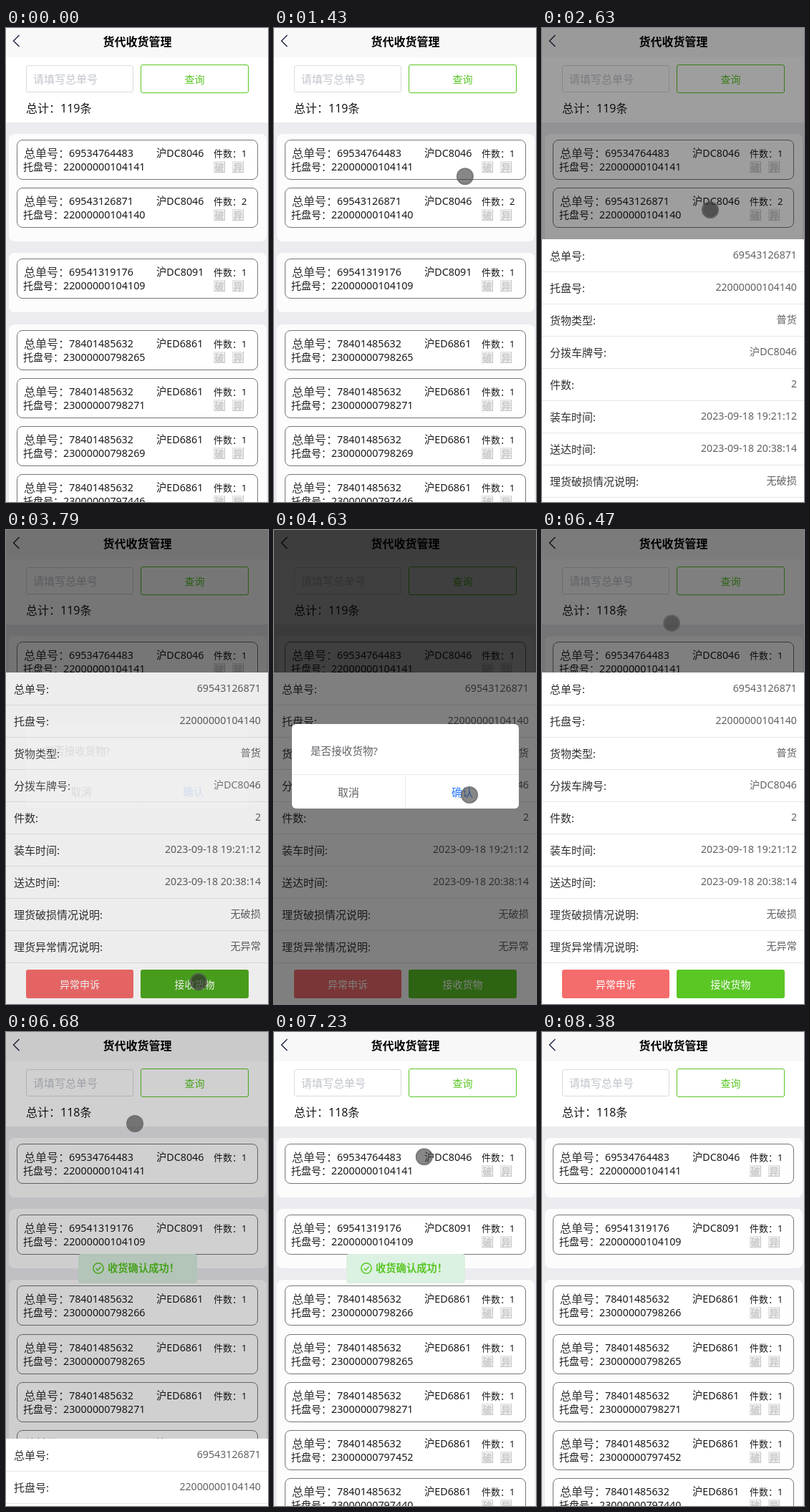
An HTML page for the animation above (8.77 s loop, 366x662 px).

```html
<!DOCTYPE html>
<html lang="zh-CN">
<head>
<meta charset="utf-8">
<style>
html, body { margin: 0; width: 100%; height: 100%; overflow: hidden; }
body { font: 14.3px/20px "Noto Sans", "Noto Sans CJK SC", "Noto Sans CJK", sans-serif; color: #1a1a1a; }
div, span { position: absolute; box-sizing: border-box; white-space: nowrap; }
#stage { left: 0; top: 0; width: 366px; height: 662px; overflow: hidden; background: #ebebf0; }
.fill { left: 0; top: 0; width: 366px; height: 662px; }
.card { left: 4px; width: 360px; border-radius: 8px; background: #fcfcfd; }
.row { left: 15px; width: 337px; height: 56px; border: 1px solid #777; border-radius: 8px; background: #fff; }
.kai { font-size: 16px; font-weight: 300; color: #333; }
.small { font-size: 13px; }
.badge { width: 16px; height: 16px; background: #eee; border: 1px solid #ddd; border-color: #e2e2e2 #c4c4c4 #c4c4c4 #e2e2e2;
  color: #c9c9c9; font: bold 13px/14px "Noto Sans CJK SC", "Noto Sans CJK", sans-serif; text-align: center; }
.btn { height: 40px; border-radius: 3px; font-size: 14px; line-height: 40px; text-align: center; }
.label { font-size: 15px; color: #303133; }
.value { right: 10px; font-size: 14.2px; color: #606266; }
.line { left: 0; width: 366px; height: 1px; background: #e6e6e8; }
#sheet { left: 0; top: 0; width: 366px; height: 464px; background: #fff; }
#dialog { left: 24.5px; top: 271px; width: 317px; height: 118px; border-radius: 6px; background: #fff; overflow: hidden; }
#toast { left: 101px; top: 310px; width: 166px; height: 41px; border-radius: 4px; background: #dbf1e1; color: #5ac725; }
#cursor { left: -12px; top: -12px; width: 24px; height: 24px; border-radius: 50%;
  border: 2px solid rgba(110,110,110,.47); background-clip: padding-box; }
</style>
</head>
<body>
<div id="stage">
  <div id="first"></div>
  <div id="second"></div>
  <div id="empty"></div>
  <div id="head"></div>
  <div id="toast"></div>
  <div id="mask" class="fill" style="background:#000"></div>
  <div id="sheet"></div>
  <div id="veil" class="fill" style="background:#000"></div>
  <div id="dialog"></div>
  <div id="cursor"></div>
</div>
<script>
const LOOP = 8770;
const $ = id => document.getElementById(id);
const css = (id, styles) => Object.assign($(id).style, styles);

const box = (x, y, w, h, style, text = '', cls = '') =>
  `<div class="${cls}" style="left:${x}px;top:${y}px;width:${w}px;height:${h}px;${style}">${text}</div>`;
// y is the middle of the line
const text = (x, y, s, cls = '', style = '') =>
  `<span class="${cls}" style="left:${x}px;top:${y - 10}px;${style}">${s}</span>`;

function row(y, [order, pallet, plate, count]) {
  const badge = (x, s) => `<div class="badge" style="left:${x}px;top:${y + 30}px">${s}</div>`;
  return `<div class="row" style="top:${y}px"></div>` +
    text(25, y + 19, '总单号：', 'kai') + text(88, y + 19, order) +
    text(24, y + 38, '托盘号：', '', 'font-size:14px') + text(80, y + 38, pallet) +
    text(210, y + 18.5, plate) + text(290, y + 19, '件数：' + count, 'small') +
    badge(290, '破') + badge(316, '异');
}

function list(total, cards) {
  let y = 148;
  let html = box(0, 0, 366, 132, 'background:#fff') +
    text(28, 112, `总计：${total}条`, '', 'font-size:16px');
  for (const rows of cards) {
    const h = rows.length * 67.2 + 16;
    html += `<div class="card" style="top:${Math.round(y)}px;height:${Math.round(h)}px"></div>`;
    rows.forEach((r, i) => html += row(Math.round(y + 8 + i * 67.2), r));
    y += h + 16;
  }
  return html;
}

const late = n => ['78401485632', '23000000' + n, '沪ED6861', 1];
const a = ['69534764483', '22000000104141', '沪DC8046', 1];
const b = ['69543126871', '22000000104140', '沪DC8046', 2];
const c = ['69541319176', '22000000104109', '沪DC8091', 1];
$('first').innerHTML = list(119, [[a, b], [c], [798265, 798271, 798269, 797446].map(late)]);
$('second').innerHTML = list(118, [[a], [c], [798266, 798265, 798271, 797452, 797440].map(late)]);
$('empty').innerHTML = box(0, 0, 366, 662, 'background:#fbfbfb') +
  box(100, 122, 168, 39, 'background:#fff;border:1px solid #f0f0f0;border-radius:3px;font-size:14px;line-height:38px;text-align:center', '显示更多...');

$('head').innerHTML = box(0, 0, 366, 41, 'background:#f8f8f8') +
  text(0, 19, '货代收货管理', '', 'width:367px;text-align:center;font-size:16px;font-weight:bold;color:#000') +
  '<svg width="30" height="40" style="position:absolute;left:0;top:0"><path d="M18.5 10L10.5 18L18.5 26" fill="none" stroke="#1c2340" stroke-width="1.4"/></svg>' +
  box(28, 52, 150, 38, 'border:1px solid #dadbde;border-radius:3px') +
  text(38, 71, '请填写总单号', '', 'font-size:15px;color:#c0c4cc') +
  box(188, 51, 151, 40, 'border:1px solid #5ac725;color:#5ac725;line-height:39px', '查询', 'btn');

$('toast').innerHTML =
  '<svg width="18" height="18" style="position:absolute;left:19px;top:11px" fill="none" stroke="#5ac725" stroke-width="1.5"><circle cx="9" cy="9" r="7.2"/><path d="M5.5 9.2L8 11.7L12.6 6.8"/></svg>' +
  text(41, 20, '收货确认成功！', '', 'font-size:14.3px;font-weight:bold');

const fields = [
  ['总单号', b[0]], ['托盘号', b[1]], ['货物类型', '普货'], ['分拨车牌号', b[2]], ['件数', b[3]],
  ['装车时间', '2023-09-18 19:21:12'], ['送达时间', '2023-09-18 20:38:14'],
  ['理货破损情况说明', '无破损'], ['理货异常情况说明', '无异常']];
$('sheet').innerHTML = fields.map(([k, v], i) =>
  text(11, i * 45 + 23, k + ':', 'label') +
  `<span class="value" style="top:${i * 45 + 12}px">${v}</span>` +
  `<div class="line" style="top:${i * 45 + 45}px"></div>`).join('') +
  box(28, 415, 150, 40, 'background:#f56c6c;color:#fff;line-height:41px', '异常申诉', 'btn') +
  '<div id="accept" class="btn" style="left:188px;top:415px;width:151px;color:#fff;line-height:41px">接收货物</div>';

$('dialog').innerHTML = text(26, 37, '是否接收货物?', '', 'font-size:14.6px;color:#606266') +
  '<div id="confirm" style="left:159px;top:71px;width:158px;height:47px"></div>' +
  box(0, 70, 317, 1, 'background:#e8e9ec') + box(158, 70, 1, 48, 'background:#e8e9ec') +
  text(0, 95, '取消', '', 'width:158px;text-align:center;font-size:15px;color:#606266') +
  text(159, 95, '确认', '', 'width:158px;text-align:center;font-size:15px;color:#2979ff');

// CSS "ease" curve, solved by bisection
function ease(p) {
  if (p <= 0) return 0;
  if (p >= 1) return 1;
  const bez = (u, p1, p2) => 3 * u * (1 - u) ** 2 * p1 + 3 * u * u * (1 - u) * p2 + u ** 3;
  let lo = 0, hi = 1;
  for (let i = 0; i < 20; i++) {
    const u = (lo + hi) / 2;
    if (bez(u, .25, .25) < p) lo = u; else hi = u;
  }
  return bez(lo, .1, 1);
}

// linear interpolation through [time, ...values]
function track(t, keys) {
  if (t <= keys[0][0]) return keys[0].slice(1);
  for (let i = 1; i < keys.length; i++) {
    const [p, q] = [keys[i - 1], keys[i]];
    if (t <= q[0]) {
      const k = (t - p[0]) / (q[0] - p[0]);
      return p.slice(1).map((v, j) => v + (q[j + 1] - v) * k);
    }
  }
  return keys[keys.length - 1].slice(1);
}

const path = [
  [330, 340, 690], [390, 338, 655], [720, 322, 400], [1000, 301, 190], [1230, 295, 134],
  [1300, 293, 147], [1430, 267, 207], [1600, 246, 239], [1830, 235, 254], [2700, 235, 254],
  [2900, 242, 340], [3150, 263, 555], [3320, 270, 616], [3450, 269, 631], [3900, 269, 631],
  [4100, 270, 560], [4400, 272, 400], [4630, 273, 370], [4890, 275, 368], [5500, 275, 368],
  [5800, 240, 270], [6200, 192, 150], [6500, 180, 128], [7030, 180, 128], [7300, 220, 190],
  [7840, 298, 351], [8100, 326, 480], [8370, 356, 678]];
const dim = [
  [2481, 0], [2630, .38], [2781, .5], [5210, .5], [5360, .72], [5900, .72], [6100, .5],
  [6530, .5], [6680, .185], [6830, 0]];
const toast = [[5920, 0], [6120, 1], [7500, 1], [7770, 0]];
const presses = [[2160, 2700], [3720, 3880], [4890, 5090]];

function draw(t) {
  const during = (from, to) => t >= from && t < to;
  const show = on => ({ display: on ? 'block' : 'none' });
  css('first', show(t < 5220));
  css('empty', show(during(5220, 5990)));
  css('second', show(t >= 5990));
  for (const el of $('second').querySelectorAll('.badge')) el.style.visibility = t < 7030 ? 'hidden' : 'visible';

  css('toast', { opacity: track(t, toast)[0] });
  css('mask', { opacity: track(t, dim)[0] });
  const open = ease((t - 2484) / 300) - ease((t - 6533) / 300);
  css('sheet', { transform: `translateY(${Math.round(663 - 464 * open)}px)` });
  css('accept', { background: during(3720, 3880) ? '#4ca81e' : '#5ac725' });

  const asked = ease((t - 3753) / 300) - ease((t - 5210) / 300);
  css('veil', { opacity: asked * .5 });
  css('dialog', { opacity: asked, transform: `scale(${.98 + .02 * asked})` });
  css('confirm', { background: during(4890, 5090) ? '#f2f3f5' : '#fff' });

  const [x, y] = track(t, path);
  const down = presses.some(([from, to]) => during(from, to));
  css('cursor', {
    transform: `translate(${x}px,${y}px)`,
    background: down ? 'rgba(45,45,45,.68)' : 'rgba(55,55,55,.6)'
  });
}

const start = performance.now();
function tick() {
  draw((performance.now() - start) % LOOP);
  requestAnimationFrame(tick);
}
tick();
</script>
</body>
</html>
```
